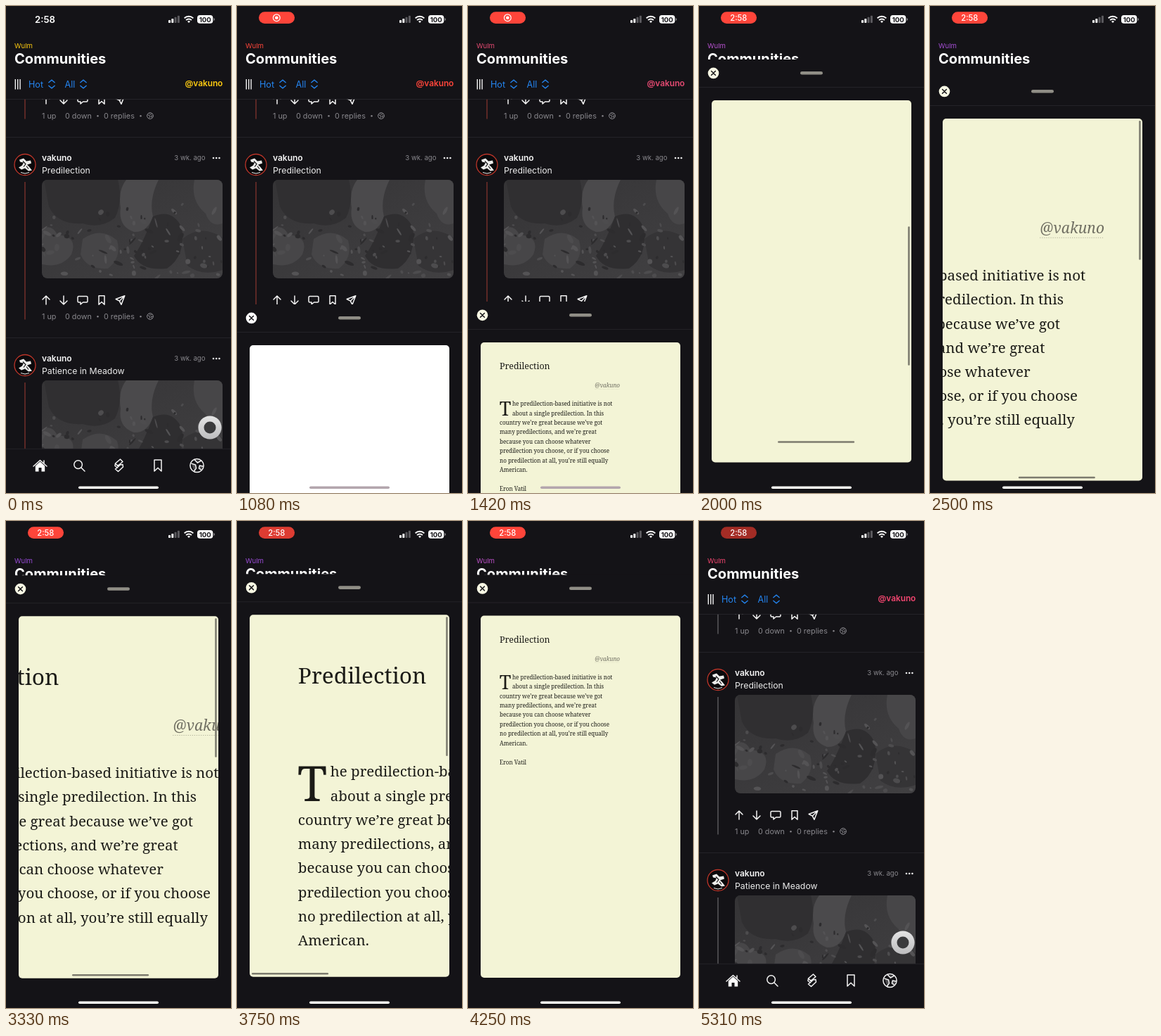
Recreate the animation shown at these times as an HTML page. Size 320x692 px, loop 5450 ms.

```html
<!DOCTYPE html>
<html lang="en">
<head>
<meta charset="utf-8">
<title>Reader sheet</title>
<style>
html, body { margin: 0; width: 100%; height: 100%; overflow: hidden; background: #141317; }
svg { display: block; width: 100%; height: 100%; font-family: Inter, "Open Sans", sans-serif; }
.serif { font-family: "Noto Serif", "Liberation Serif", serif; fill: #1b1b17; }
.line { fill: none; stroke: #f4f4f4; stroke-width: 1.5; stroke-linecap: round; stroke-linejoin: round; }
.dim { fill: #88878c; }
.blue { fill: #2486f2; }
.rule { stroke: #29282c; stroke-width: .8; }
</style>
</head>
<body>
<svg id="stage" viewBox="0 0 320 692"></svg>
<script>
const LOOP = 5450, ZOOM = 2.55;
const HANDLE = "vakuno";
const stage = document.getElementById("stage");

// Timing helpers
const clamp = x => Math.min(1, Math.max(0, x));
const smooth = x => x * x * (3 - 2 * x);
const easeOut = x => 1 - (1 - x) ** 3;

// keys: [time, value, easing into this key]
function track(keys, t) {
  if (t <= keys[0][0]) return keys[0][1];
  for (let i = 1; i < keys.length; i++) {
    const [t0, a] = keys[i - 1], [t1, b, ease = smooth] = keys[i];
    if (t < t1) {
      const k = ease((t - t0) / (t1 - t0));
      return Array.isArray(a) ? a.map((v, n) => v + (b[n] - v) * k) : a + (b - a) * k;
    }
  }
  return keys[keys.length - 1][1];
}
const rgb = c => `rgb(${c.map(Math.round)})`;

// Markup helpers
const text = (x, y, size, str, attrs = "") =>
  `<text x="${x}" y="${y}" font-size="${size}" ${attrs}>${str}</text>`;
const at = (x, y, body, attrs = "") => `<g transform="translate(${x} ${y})" ${attrs}>${body}</g>`;
const path = (d, attrs = "") => `<path d="${d}" ${attrs}/>`;
const circle = (x, y, r, attrs) => `<circle cx="${x}" cy="${y}" r="${r}" ${attrs}/>`;
const rect = (x, y, w, h, r, attrs) =>
  `<rect x="${x}" y="${y}" width="${w}" height="${h}" rx="${r}" ${attrs}/>`;

const BOOKMARK = "M-4 -6.3h8v12.6l-4-3.8-4 3.8z";
const CHEVRONS = "M-4.6 -2L0 -5.8L4.6 -2M-4.6 2L0 5.8L4.6 2";

function pattern() {
  let seed = 11;
  const rand = () => (seed = (seed * 16807) % 2147483647) / 2147483647;
  const big = (d, fill) => path(d, `fill="${fill}"`);
  let out = rect(0, 0, 257, 140, 0, 'fill="url(#tone)"');
  out += big("M120 0H166Q152 28 158 52Q150 75 131 74Q108 66 112 40Q108 15 120 0Z", "#4b4a4c");
  out += big("M217 0H257V62Q240 68 233 48Q211 30 217 0Z", "#474648");
  out += big("M0 70Q14 62 22 78Q52 80 42 106Q28 126 0 120Z", "#474648");
  out += big("M58 84Q84 66 107 86Q114 110 94 126Q64 128 55 106Z", "#464547");
  out += big("M3 0H108Q116 30 104 54Q84 70 58 62Q22 64 10 38Z", "#302f31");
  out += big("M158 52Q186 40 199 68Q205 108 178 126Q142 130 131 108Q144 90 158 52Z", "#2f2e30");
  out += big("M200 84Q226 62 257 82V128Q228 138 207 122Z", "#353436");
  const tones = ["#545355", "#2d2c2e", "#4d4c4e"];
  for (let i = 0; i < 95; i++) {
    const x = rand() * 257, y = 140 - 95 * rand() ** 1.2 - (i % 5 ? 0 : 38 * rand());
    const a = 1 + 6.5 * rand() ** 2, b = 1 + 2.5 * rand();
    out += `<ellipse rx="${a.toFixed(1)}" ry="${b.toFixed(1)}" fill="${tones[i % 3]}" ` +
      `transform="translate(${x.toFixed(1)} ${y.toFixed(1)}) rotate(${Math.round(rand() * 180)})"/>`;
  }
  return out;
}

const globe = (r, attrs) => circle(0, 0, r, "") + path(
  `M${-.8 * r} ${-.3 * r}L${-.2 * r} ${-.1 * r}L${-.1 * r} ${.4 * r}L${-.4 * r} ${.8 * r}` +
  `M${-.3 * r} ${-.8 * r}L${.1 * r} ${-.4 * r}L${.6 * r} ${-.7 * r}` +
  `M${.9 * r} ${.1 * r}L${.4 * r} 0L${.3 * r} ${.4 * r}L${.6 * r} ${.6 * r}`, attrs);

const avatar = circle(0, 0, 15, 'fill="#0b0a0c" stroke="#bd3529" stroke-width="1.3"') +
  path("M-8 -7L-2 -9L2 -5L8 -6L9 -2L3 0L6 3L10 8L5 9L0 5L-5 7L-9 4L-4 1L-2 -3L-7 -4Z", 'fill="#eeeeec"') +
  path("M-3 -5L1 -1L-2 3M2 2L5 6", 'fill="none" stroke="#0b0a0c" stroke-width="1.1"') +
  path("M-6 11Q0 14 6 11", 'fill="none" stroke="#eeeeec" stroke-width="1"');

function post(dy, title) {
  const icons =
    at(57, 418, path("M0 6V-6M-5 -1L0 -6L5 -1")) +
    at(82, 418, path("M0 -6V6M-5 1L0 6L5 1")) +
    at(109, 418, path("M-5.5 -5.5h11q1.5 0 1.5 1.5v5.5q0 1.5-1.5 1.5h-5l-3.5 3v-3h-2.5q-1.5 0-1.5-1.5v-5.5q0-1.5 1.5-1.5z")) +
    at(136, 418, path(BOOKMARK)) +
    at(162.5, 418, path("M6.3 -6.2L-6.3 -1.5L-1.2 1.2L1.5 6.3ZM6.3 -6.2L-1.2 1.2"));
  return at(0, dy,
    `<line class="rule" x2="320" y1="186.5" y2="186.5"/>` +
    `<line class="thread" x1="27" x2="27" y1="250" y2="445.5" stroke-width="1.4"/>` +
    at(27, 225.5, avatar) +
    text(51, 220, 12, HANDLE, 'fill="#f6f6f6" font-weight="600"') +
    text(51, 238, 12.3, title, 'fill="#ececec"') +
    text(283.5, 219.3, 9.6, "3 wk. ago", 'class="dim" text-anchor="end"') +
    [295, 299.2, 303.4].map(x => circle(x, 216, 1.3, 'fill="#f2f2f2"')).join("") +
    at(51, 247, `<use href="#art"/>`) +
    `<g class="line">${icons}</g>` +
    `<g class="dim">` + text(51, 445, 10.8, "1 up") + text(84, 445, 10.8, "0 down") +
    circle(130.5, 441.3, 1.2, "") + text(139, 445, 10.8, "0 replies") + circle(191.5, 441.3, 1.2, "") + "</g>" +
    at(205, 441, globe(4.4, ""), 'fill="none" stroke="#88878c" stroke-width="1"'));
}

const statusBar =
  text(55.5, 23.7, 13.2, "2:58", 'id="clock" fill="#fff" font-weight="600" text-anchor="middle"') +
  `<g id="pill">` + rect(31, 8.3, 51, 16.7, 8.3, 'id="pillShape"') +
  `<g id="rec">` + circle(56.3, 16.7, 4.9, 'fill="none" stroke="#fff" stroke-width="1.2"') +
  circle(56.3, 16.7, 2.3, 'fill="#fff"') + "</g>" +
  text(56.3, 20.7, 11.2, "2:58", 'id="pillTime" fill="#fff" font-weight="500" text-anchor="middle"') + "</g>" +
  [0, 1, 2, 3].map(i => rect(231 + i * 4.3, 20 - i * 2.1, 3, 4 + i * 2.1, .8,
    `fill="${i < 2 ? "#fff" : "#5b5a5e"}"`)).join("") +
  at(260, 23.6, path("M-6.3 -6.2A9 9 0 0 1 6.3 -6.2M-3.9 -3.5A5.6 5.6 0 0 1 3.9 -3.5",
    'fill="none" stroke="#fff" stroke-width="2"') + path("M0 .4L-2 -1.7A3 3 0 0 1 2 -1.7Z", 'fill="#fff"')) +
  rect(272, 13, 22.3, 11.8, 3.8, 'fill="#fff"') + path("M295.4 17v4q1.6-.6 1.6-2t-1.6-2z", 'fill="#8b8a8e"') +
  text(283.2, 22.5, 9.6, "100", 'fill="#141317" font-weight="700" text-anchor="middle"');

const header =
  text(12, 59.5, 9.6, "Wulm", 'class="accent"') +
  text(12, 82, 20.1, "Communities", 'fill="#fff" font-weight="700"') +
  path("M13.3 104V118.5M16.7 104V118.5M20.1 104V118.5", 'stroke="#f0f0f0" stroke-width="1.4"') +
  text(32, 115.6, 12.6, "Hot", 'class="blue"') + text(83.5, 115.6, 12.6, "All", 'class="blue"') +
  [65, 110].map(x => at(x, 111, path(CHEVRONS, 'fill="none" stroke="#2486f2" stroke-width="1.3"'))).join("") +
  text(308.3, 114.3, 11.8, "@" + HANDLE, 'class="accent" font-weight="600" text-anchor="end"') +
  `<line class="rule" x2="320" y1="132.5" y2="132.5"/>`;

const tabBar = rect(0, 629, 320, 63, 0, 'fill="#141317"') +
  `<line class="rule" x2="320" y1="629.3" y2="629.3"/>` +
  at(48.5, 653.5, path("M-9.5 .5L0 -8L9.5 .5M5.5 -7.5V-4", 'class="line"') +
    path("M-6.7 0L0 -6L6.7 0V8H2V2.5H-2V8H-6.7Z", 'fill="#fff"')) +
  `<g class="line">` +
  at(104, 653, circle(-1.4, -1.4, 5.8, "") + path("M3 3L8 8")) +
  at(160.5, 653, path("M-5 -3L2 -9L5.5 -5.5L-1.5 .5ZM-1.5 -.5L5.5 -1.5L6 2L-1 8.5L-5 5L1 0M-5 -3L-5.5 .5L-2 3")) +
  at(216, 653, path("M-5 -8h10v16l-5-4.8-5 4.8z")) +
  at(271.5, 653, globe(9.6, 'fill="#fff" fill-opacity=".25"')) + "</g>";

const bodyLines = [
  "he predilection-based initiative is not", "about a single predilection. In this",
  "country we’re great because we’ve got", "many predilections, and we’re great",
  "because you can choose whatever", "predilection you choose, or if you choose",
  "no predilection at all, you’re still equally", "American.", "", "Eron Vatil"];
const page =
  text(27, 38.2, 12.4, "Predilection") +
  text(198, 64, 8.2, "@" + HANDLE, 'font-style="italic" text-anchor="end" style="fill:#6f6e62"') +
  path("M162 66.4H198", 'stroke="#b4b49c" stroke-width=".4" stroke-dasharray=".5 .7"') +
  text(26.7, 104, 26.9, "T") +
  bodyLines.map((s, i) => text(i < 2 ? 45 : 27, 90.2 + i * 13.43, 8.04, s)).join("");

const sheet = rect(0, 0, 320, 692, 0, 'fill="#141317"') +
  `<line class="rule" x2="320" y1="39.5" y2="39.5"/>` +
  circle(20.5, 19.4, 7.8, 'id="close"') +
  path("M17.6 16.5L23.4 22.3M23.4 16.5L17.6 22.3", 'stroke="#141317" stroke-width="1.5" stroke-linecap="round"') +
  rect(144, 17, 32, 4.6, 2.3, 'fill="#908e86"') +
  rect(18, 58, 284, 514.5, 5, 'id="card"') +
  `<g clip-path="url(#cardClip)"><g id="page" class="serif">${page}</g>` +
  `<g id="bars" fill="#7c7b6e">` + rect(297.2, 0, 2.5, 198, 1.25, 'id="vBar"') +
  rect(0, 0, 109, 2.5, 1.25, 'id="hBar"') + "</g></g>";

stage.innerHTML = `<defs>
  <linearGradient id="tone" x2="1" y2="1"><stop stop-color="#353436"/><stop offset="1" stop-color="#414042"/></linearGradient>
  <linearGradient id="pearl" x2="0" y2="1"><stop stop-color="#e4e4e4"/><stop offset="1" stop-color="#bdbdbf"/></linearGradient>
  <clipPath id="artClip">${rect(0, 0, 257, 140, 8, "")}</clipPath>
  <clipPath id="feedClip">${rect(0, 132, 320, 497, 0, "")}</clipPath>
  <clipPath id="cardClip">${rect(18, 58, 284, 514.5, 5, "")}</clipPath>
  <g id="art" clip-path="url(#artClip)">${pattern()}</g></defs>` +
  rect(0, 0, 320, 692, 0, 'fill="#141317"') +
  `<g clip-path="url(#feedClip)">${post(-285, "")}${post(0, "Predilection")}${post(285, "Patience in Meadow")}</g>` +
  header + circle(290, 599, 16.6, 'fill="url(#pearl)"') + circle(290, 599, 8.5, 'fill="#3a3a3c"') +
  tabBar + `<g id="sheet">${sheet}</g>` + statusBar +
  rect(103, 682.4, 114, 3.6, 1.8, 'id="home"');

const el = {};
stage.querySelectorAll("[id]").forEach(n => el[n.id] = n);
const set = (id, attrs) => { for (const k in attrs) el[id].setAttribute(k, attrs[k]); };
const paint = (cls, attr, color) =>
  stage.querySelectorAll("." + cls).forEach(n => n.setAttribute(attr, color));

// Motion
const linear = x => x;
const accent = [[80, [255, 204, 16]], [580, [255, 69, 58], linear], [1080, [255, 69, 58]],
  [2000, [184, 82, 208], linear], [2920, [150, 74, 218], linear], [3750, [155, 76, 214], linear],
  [4250, [188, 80, 200], linear], [5310, [244, 70, 112], linear]];
const sheetTop = [[800, 694], [1080, 424, easeOut], [1400, 424], [1730, 76], [2170, 76], [2490, 102],
  [3080, 102], [3380, 75.3], [3760, 75.3], [4200, 76.5], [4690, 76.5], [5160, 694]];
const zoom = [[1680, 1], [1960, ZOOM], [3770, ZOOM], [4210, 1]];
const scrollX = [[1680, 0], [1960, 240], [2030, 240], [2420, 275], [3180, 275], [3600, 0]];
const scrollY = [[1680, 0], [1960, 457], [2020, 457], [2420, 0]];
const barInset = [[2050, 29], [2400, 4.5]];

function render(t) {
  const color = rgb(track(accent, t));
  paint("accent", "fill", color);
  paint("thread", "stroke", t < 3000 ? "#79322b" : "#5e5d60");

  // Recording pill dims briefly every 1.5 s
  const shown = smooth(clamp((t - 200) / 250));
  const gap = Math.abs(((t - 850 + 4500 + 750) % 1500) - 750);
  const dim = gap < 160 ? .21 * (1 + Math.cos(Math.PI * gap / 160)) : 0;
  set("clock", { opacity: 1 - shown });
  set("pill", { opacity: shown });
  set("pillShape", { fill: rgb([255, 69, 58].map(v => v * (1 - dim))) });
  set("rec", { opacity: t < 1450 ? 1 : 0 });
  set("pillTime", { opacity: t < 1450 ? 0 : 1 });

  const top = track(sheetTop, t), z = track(zoom, t);
  const sx = track(scrollX, t), sy = track(scrollY, t), loaded = t >= 1170;
  set("sheet", { transform: `translate(0 ${top.toFixed(2)})` });
  set("card", { fill: loaded ? "#f3f4d6" : "#fff" });
  set("close", { fill: loaded ? "#f8f8e4" : "#fff" });
  set("page", { opacity: loaded ? 1 : 0, transform: `translate(${18 - sx} ${58 - sy}) scale(${z})` });
  set("bars", { opacity: clamp((z - 1) / .5) });
  set("vBar", { y: 58 + Math.max(3, sy / z), height: 504 / z });
  set("hBar", { x: 18 + Math.max(3, sx / z), y: 572.5 - track(barInset, t) - 1.2, width: 278 / z });
  const covered = top + 58 < 684 && top + 572.5 > 684;
  set("home", { fill: covered ? "#b3a6ad" : "#fdfdf8" });
}

const start = performance.now();
function tick() {
  render((performance.now() - start) % LOOP);
  requestAnimationFrame(tick);
}
tick();
</script>
</body>
</html>
```
